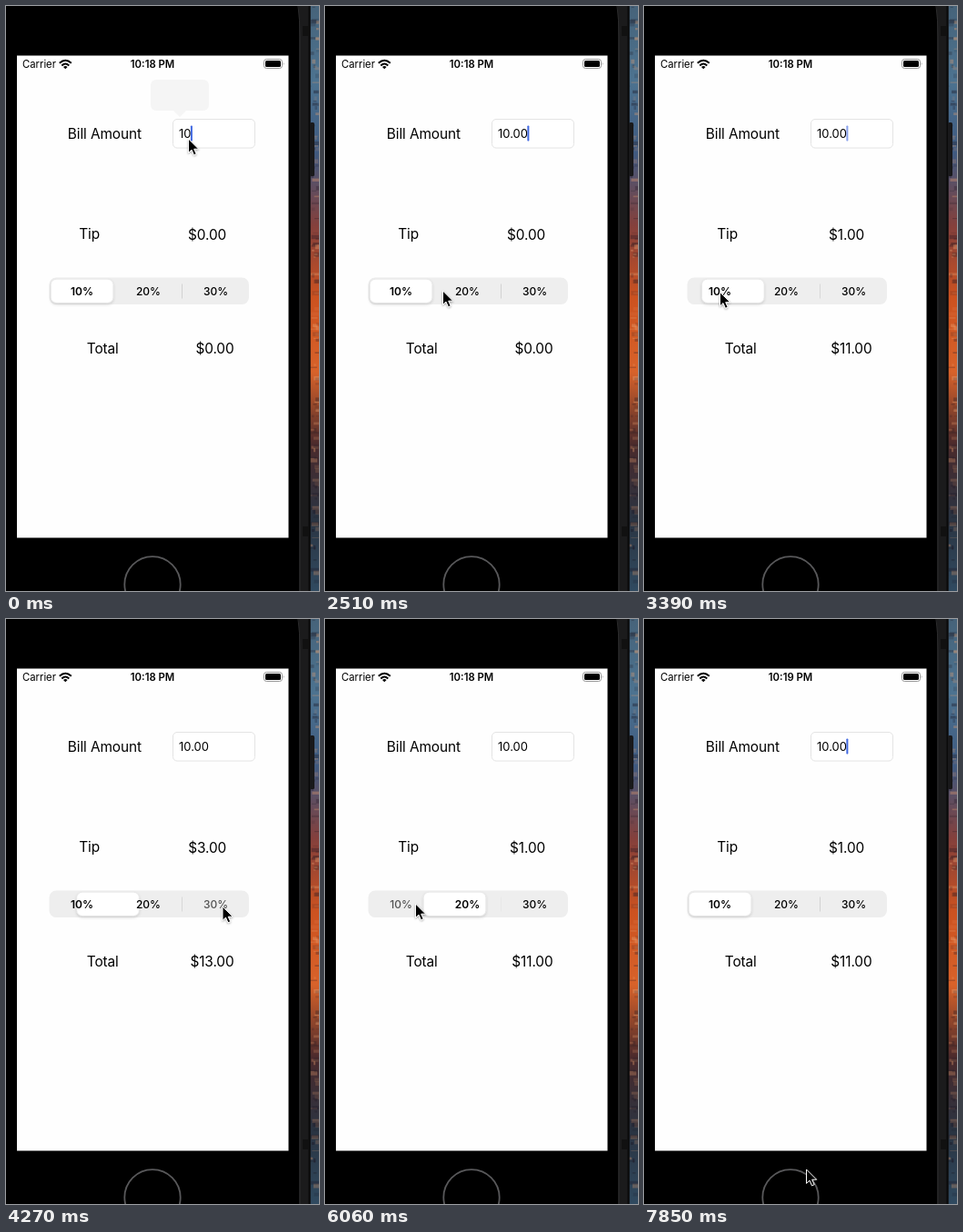
An HTML page that plays this animation: 344 by 643 pixels, repeating every 7.99 s.

```html
<!DOCTYPE html>
<html lang="en">
<head>
<meta charset="utf-8">
<title>Tip calculator</title>
<style>
  html, body { margin: 0; width: 100%; height: 100%; overflow: hidden; background: #000; }
  svg { display: block; width: 344px; height: 643px; }
  text { font-family: Inter, Roboto, "Liberation Sans", sans-serif; fill: #000; white-space: pre; }
  .label { font-size: 15.4px; letter-spacing: -.1px; }
  .end { text-anchor: end; }
  .mid { text-anchor: middle; }
  .status { font-size: 11.3px; }
  .seg { font-size: 12px; font-weight: 500; text-anchor: middle; }
</style>
</head>
<body>
<svg viewBox="0 0 344 643">
  <defs>
    <linearGradient id="sky" x1="0" y1="0" x2="0" y2="1"></linearGradient>
    <filter id="soft" x="-20%" y="-30%" width="140%" height="180%">
      <feDropShadow dx="0" dy="1.5" stdDeviation="1.5" flood-opacity=".16"/>
    </filter>
    <filter id="drop" x="-30%" y="-30%" width="180%" height="180%">
      <feDropShadow dx="0" dy="1" stdDeviation=".8" flood-opacity=".35"/>
    </filter>
  </defs>

  <rect width="344" height="643"/>
  <rect x="333" width="11" height="643" fill="url(#sky)"/>
  <g id="strokes"></g>
  <path d="M322 0H334.5V643H322Z" fill="#1b1b1c"/>
  <path d="M321 0Q323 14 323 34V643" fill="none" stroke="#2c2c2d"/>
  <path d="M333.5 0V643" stroke="#0a0a0a" stroke-width="2"/>
  <path d="M326 22h7v11h-7zM326 572h7v11h-7z" fill="#111"/>
  <rect x="334" y="128" width="5" height="59" rx="1.5" fill="#19191b"/>
  <circle cx="161" cy="635.8" r="30.7" fill="none" stroke="#58585a" stroke-width="1.8"/>
  <rect x="12" y="54.5" width="298.5" height="530" fill="#fefefe"/>

  <text class="status" x="18" y="68">Carrier</text>
  <g fill="none" stroke="#000" stroke-width="2">
    <path d="M58.8 62.8Q65.3 56.8 71.8 62.8M61.3 65.4Q65.3 61.6 69.3 65.4"/>
    <path d="M63 66.9Q65.3 65 67.6 66.9L65.3 69.2Z" fill="#000" stroke="none"/>
  </g>
  <text id="clock" class="status mid" x="161" y="68" font-weight="600"></text>
  <rect x="283.5" y="58.5" width="20" height="10" rx="2.8" fill="none" stroke="#999"/>
  <rect x="285" y="60" width="17" height="7" rx="1.5"/>
  <path d="M304.8 61.8q1.6 1.7 0 3.4z" fill="#999"/>

  <path id="bubble" fill="#f5f5f5" d="M165 81H217a6 6 0 0 1 6 6V109a6 6 0 0 1-6 6H198L191 122L184 115H165a6 6 0 0 1-6-6V87a6 6 0 0 1 6-6Z"/>
  <text class="label" x="67.8" y="146">Bill Amount</text>
  <rect x="183.5" y="124.5" width="90" height="31.5" rx="4.5" fill="#fff" stroke="#e4e4e4"/>
  <text id="bill" x="190" y="145" font-size="13"></text>
  <rect id="caret" y="131.5" width="2" height="17" rx=".8" fill="#4169e1"/>

  <text class="label" x="80.2" y="256">Tip</text>
  <text id="tip" class="label end" x="242.2" y="257"></text>
  <rect x="47.5" y="298.5" width="219.5" height="29.5" rx="7.5" fill="#eeeeee"/>
  <path class="line" d="M119.5 305.5V321.5" stroke="#d2d2d2"/>
  <path class="line" d="M193.5 305.5V321.5" stroke="#d2d2d2"/>
  <rect id="thumb" y="300.3" width="68.5" height="26" rx="6" fill="#fff" stroke="#e2e2e2" stroke-width=".6" filter="url(#soft)"/>
  <text class="seg" x="83.5" y="318">10%</text>
  <text class="seg" x="156.5" y="318">20%</text>
  <text class="seg" x="230.5" y="318">30%</text>
  <text class="label" x="88.8" y="382">Total</text>
  <text id="total" class="label end" x="250.6" y="382"></text>

  <path id="mouse" d="M0 0V15.4L3.5 12.1L6 17.8L8.7 16.6L6.2 11.2H11.2Z" stroke="#fff" filter="url(#drop)"/>
</svg>
<script>
const LOOP = 7990, STEP = 147.3, LAST = 53;
const $ = id => document.getElementById(id);
const segs = document.querySelectorAll('.seg');
const lines = document.querySelectorAll('.line');

// pointer moves: first step, last step, end point
const moves = [
  [5, 10, 210.5, 256.5], [11, 17, 129.5, 313], [17, 19, 148, 316], [20, 23, 83.5, 314.5],
  [24, 28, 238, 316], [33, 36, 150, 317], [38, 41, 99.5, 313],
  [41, 45, 218, 423], [46, 49, 291, 560], [49, 53, 178.5, 605]
];
// step and segment of each tap
const taps = [[19, 1], [22, 0], [29, 2], [36, 1], [41, 0]];

const lerp = (a, b, p) => a + (b - a) * p;
const clamp = v => Math.max(0, Math.min(1, v));
const ease = p => p * p * (3 - 2 * p);

function add(parent, tag, attrs) {
  const el = document.createElementNS('http://www.w3.org/2000/svg', tag);
  for (const k in attrs) el.setAttribute(k, attrs[k]);
  parent.append(el);
}

function paintWall() {
  const hues = ['#46637a', '#4d7390', '#3f5a80', '#84403c', '#cc5220', '#d8622a', '#4a2a2c', '#2a3442', '#304a60'];
  hues.forEach((c, i) => add($('sky'), 'stop', { offset: i / (hues.length - 1), 'stop-color': c }));
  let seed = 7;
  const rand = () => (seed = seed * 16807 % 2147483647) / 2147483647;
  for (let i = 0; i < 130; i++) {
    add($('strokes'), 'rect', {
      x: 333 + rand() * 8, y: rand() * 643, width: 2 + rand() * 8, height: 1 + rand() * 4,
      fill: rand() < .65 ? '#1a1420' : '#e8a070', opacity: .1 + rand() * .3
    });
  }
}

function pointer(step) {
  let x = 200.5, y = 146;
  for (const [a, b, tx, ty] of moves) {
    const p = ease(clamp((step - a) / (b - a)));
    x = lerp(x, tx, p);
    y = lerp(y, ty, p);
  }
  return `translate(${x} ${y})`;
}

function caretAlpha(ms) {
  if (ms < 860) return 1;
  const p = ms % 1000 / 1000;
  return p < .7 ? clamp((p - .3) / .14) : clamp((1 - p) / .14);
}

function drawSegments(step) {
  let from = 0, sel = 0, p = 1, tip = 0;
  for (const [at, seg] of taps) {
    if (step < at) break;
    from = sel;
    sel = seg;
    p = ease(clamp((step - at + .8) / 3 + .003));
    tip = seg + 1;
    p = ease(clamp((step - at + .65) / 2.3));
  }
  const bold = p < .5 ? from : sel;
  $('thumb').setAttribute('x', 49.3 + 73.2 * lerp(from, sel, p));
  segs.forEach((s, i) => {
    s.style.fontWeight = i === bold ? 600 : 500;
    s.style.opacity = i === sel && p < .5 ? .65 : 1;
  });
  lines.forEach((l, i) => {
    const shown = s => s === (i ? 0 : 2) ? 1 : 0;
    l.style.opacity = lerp(shown(from), shown(sel), p);
  });
  $('tip').textContent = `$${tip}.00`;
  $('total').textContent = `$${tip && 10 + tip}.00`;
}

function draw(t) {
  // the screen refreshes in even steps
  const step = Math.min(LAST, Math.floor((t + 15) / STEP));
  $('bill').textContent = '10.00'.slice(0, step < 3 ? 2 + step : step < 4 ? 4 : 5);
  $('caret').setAttribute('x', 190 + $('bill').getComputedTextLength() - .6);
  $('caret').style.opacity = caretAlpha(step * STEP);
  $('bubble').style.opacity = step < 1 ? 1 : 0;
  $('clock').textContent = step < 44 ? '10:18 PM' : '10:19 PM';
  $('mouse').setAttribute('transform', pointer(step));
  drawSegments(step);
}

function tick() {
  draw(performance.now() % LOOP);
  requestAnimationFrame(tick);
}
paintWall();
tick();
</script>
</body>
</html>
```
